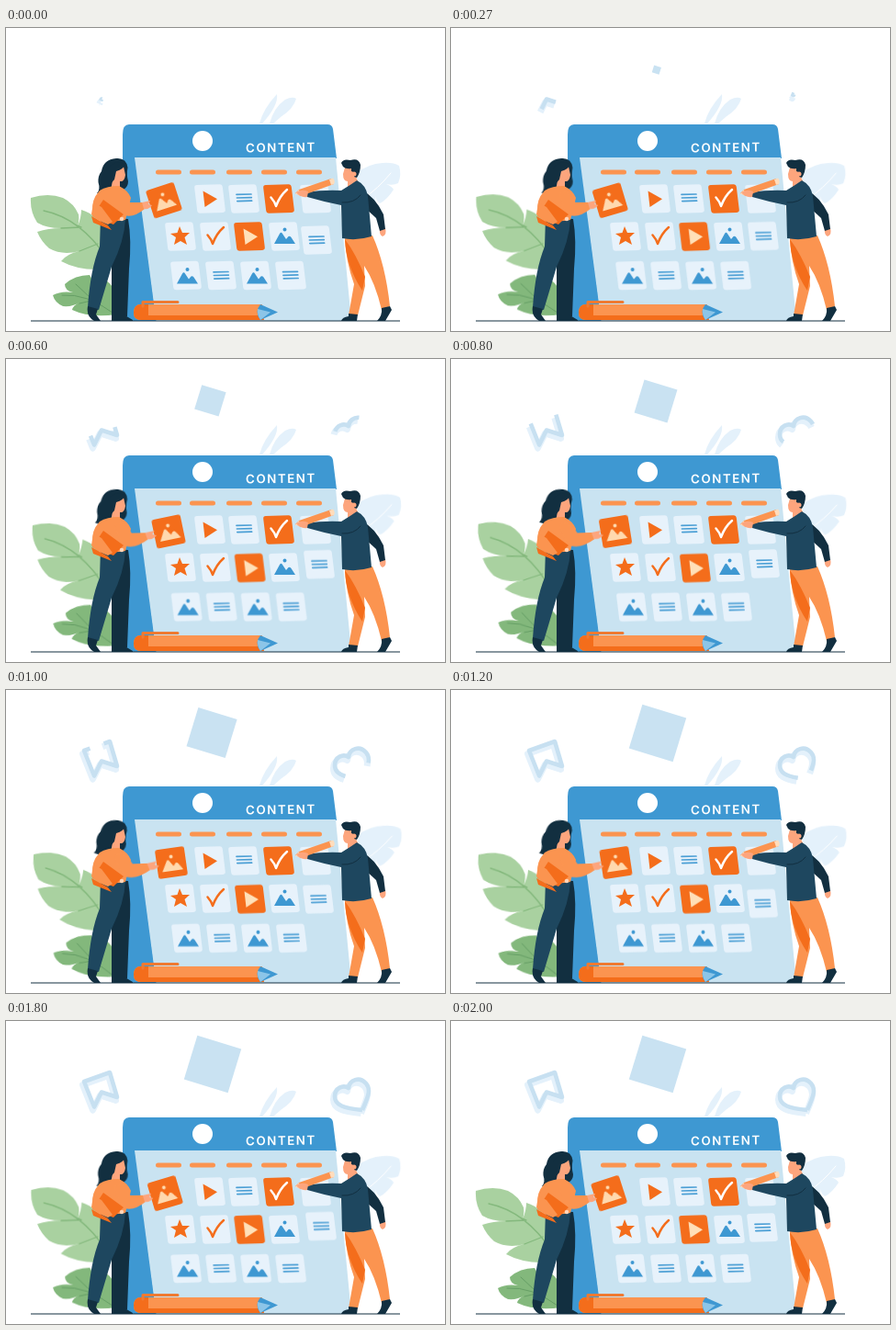
An HTML page for the animation above (2.07 s loop, 478 by 330 pixels).

```html
<!DOCTYPE html>
<html lang="en">
<head>
<meta charset="utf-8">
<title>Content calendar</title>
<style>
html, body { margin: 0; width: 100%; height: 100%; overflow: hidden; background: #fff; }
svg { display: block; width: 100vw; height: 100vh; }

:root {
  --blue: #3e98d2; --panel: #c9e3f1; --pale: #e4f1fb; --tile: #e7f2fb;
  --orange: #f46d1b; --peach: #fb9450; --skin: #fda57d;
  --navy: #1e475f; --ink: #122f40; --leaf: #a9d1a0; --moss: #83b87c;
}
text { font: 600 13.4px Inter, "Open Sans", sans-serif; letter-spacing: 1.5px; fill: #fff; }
.line { fill: none; stroke-linecap: round; stroke-linejoin: round; }

/* sway: out and back once per loop */
.sway { animation: 1.035s cubic-bezier(.37, 0, .63, 1) infinite alternate; }
.held { animation-name: held; }
.arm { animation-name: arm; transform-origin: 120px 192px; }
.hair { animation-name: hair; transform-origin: 122px 146px; }
.leaf { animation-name: leaf; transform-origin: 115px 228px; }
.fern { animation-name: leaf; transform-origin: 118px 298px; }
.far { animation-name: far; transform-origin: 388px 200px; }
.drift { animation-name: drift; }
@keyframes held {
  from { transform: translate(172px, 187.7px) rotate(-18deg); }
  to { transform: translate(180px, 188px) rotate(-8deg); }
}
@keyframes arm { to { transform: rotate(-2deg) scaleX(1.2); } }
@keyframes hair { to { transform: rotate(6deg); } }
@keyframes leaf { to { transform: rotate(4deg); } }
@keyframes far { to { transform: rotate(2deg); } }
@keyframes drift { to { transform: translate(1px, .7px); } }

/* loose note wanders, then snaps back */
.note { animation: note 2.07s ease-in-out infinite; }
@keyframes note {
  0% { transform: translate(338px, 231px); }
  22.7% { transform: translate(341px, 224px); }
  38.6% { transform: translate(341px, 223px); }
  58% { transform: translate(339px, 232.5px); }
  71% { transform: translate(346px, 233px); }
  87% { transform: translate(343px, 223.5px); }
  96.6%, 100% { transform: translate(339px, 225px); }
}

/* outlines grow both ways from the notch at mid-path */
.mark { fill: none; stroke-width: 4.6; stroke: #c7e0f1; stroke-linejoin: round; }
.mark .shade { stroke: var(--pale); stroke-width: 7; transform: translate(-1.5px, 3.5px); }
.ribbon path { animation: ribbon 2.07s linear infinite; }
.heart path { animation: heart 2.07s linear infinite; }
@keyframes ribbon {
  0% { stroke-dasharray: 0 49 2 100; }
  22.7% { stroke-dasharray: 0 35 30 100; }
  38.6% { stroke-dasharray: 0 16 68 100; }
  55%, 100% { stroke-dasharray: 0 0 100 100; }
}
@keyframes heart {
  0%, 11% { stroke-dasharray: 0 50 0 100; }
  22.7% { stroke-dasharray: 0 42 16 100; }
  38.6% { stroke-dasharray: 0 24 52 100; }
  58% { stroke-dasharray: 0 9 82 100; }
  69%, 100% { stroke-dasharray: 0 0 100 100; }
}
.badge { animation: badge 2.07s linear infinite; }
@keyframes badge {
  0%, 7% { transform: translate(225px, 46px) rotate(17deg) scale(0); }
  22.7% { transform: translate(222px, 45px) rotate(17deg) scale(.42); }
  38.6% { transform: translate(223px, 46px) rotate(17deg) scale(.75); }
  57%, 100% { transform: translate(225px, 47px) rotate(17deg) scale(1); }
}
</style>
</head>
<body>
<svg viewBox="0 0 478 330" preserveAspectRatio="none">
  <defs>
    <g id="tile"><rect x="-15.300" y="-15.300" width="30.600" height="30.600" rx="3" transform="matrix(1 -.03 .12 1 0 0)"/></g>
    <path id="rows" class="line" d="M-8-3.600 8-4M-7.600 0 8.300-.4M-7.200 3.600 8.600 3.200" stroke="#4b9fd5" stroke-width="1.700"/>
    <path id="hills" d="M-11 9-5-2Q-3.500-4.500-2-2L2 4 4.500 1Q6 0 7.500 2L12 9ZM-1.500-6.500a2 2 0 1 0 4 0a2 2 0 1 0-4 0"/>
    <path id="play" d="M-7.500-8.500 8 .3-5.500 9Z"/>
    <path id="check" class="line" d="M-8.500-.5Q-4.500 4-3 9Q1-2 9-9" stroke-width="2.500"/>
  </defs>

  <!-- leaves -->
  <g fill="var(--pale)">
    <path d="M276 104Q280 88 295 72Q297 84 279 104ZM287 104Q292 86 304 78Q312 74 316 77Q313 88 299 97L291 104Z"/>
    <g class="sway far">
      <path d="M382 192V158Q394 148 410 147Q421 146 428 150Q431 160 427 169Q421 172 414 170Q421 173 422 176Q415 187 407 191Q403 188 402 183Q403 191 402 194Q392 200 384 199Z"/>
      <path class="line" d="M389 186Q405 175 419 158" stroke="#fff" stroke-width="1"/>
    </g>
  </g>
  <g class="sway leaf">
    <path fill="var(--leaf)" d="M114 262Q82 266 60 254Q66 246 80 243Q61 248 47 240Q38 232 34 222Q46 218 60 218Q44 218 34 212Q26 200 27 185Q46 179 62 185Q74 191 79 203Q80 210 78 216Q82 206 82 198Q99 203 106 219L115 240Z"/>
    <path class="line" d="M41 199Q81 207 111 252M60 218 82 217M80 243 100 235M78 215 82 217" stroke="var(--moss)" stroke-width="1.300"/>
  </g>
  <g class="sway fern">
    <path fill="var(--moss)" d="M120 312Q91 316 72 307Q73 302 80 299Q72 304 62 303Q53 299 51 291Q60 286 73 288Q64 286 64 279Q75 269 91 269Q95 275 94 281Q97 275 97 270Q111 272 119 287Z"/>
    <path class="line" d="M61 291Q88 289 116 310M76 279 92 294M80 300 97 296" stroke="#659e65" stroke-width="1"/>
  </g>

  <!-- calendar -->
  <path fill="var(--blue)" d="M134 105H350Q355 105 356 110L360 142H141L164 319H127V116Q127 105 134 105Z"/>
  <path fill="var(--panel)" d="M140 141H359L376 319H163.500Z"/>
  <circle cx="214" cy="123" r="11" fill="#fff"/>
  <text x="261" y="135" transform="rotate(-.8 299 130)">CONTENT</text>
  <path class="line" d="M165.500 157h23M202.500 157h23M242.500 157h23M280.500 157h23M318.500 157h23" stroke="var(--peach)" stroke-width="5"/>

  <g fill="var(--tile)">
    <use href="#tile" x="222" y="186"/><use href="#tile" x="259" y="186"/><use href="#tile" x="337" y="186"/>
    <use href="#tile" x="190" y="227"/><use href="#tile" x="228" y="227"/><use href="#tile" x="303" y="227"/>
  </g>
  <g fill="var(--orange)"><use href="#tile" x="297" y="186"/><use href="#play" x="222" y="186"/></g>
  <use href="#rows" x="259" y="185"/>
  <use href="#check" x="297" y="185" stroke="#fff"/>
  <use href="#check" x="228" y="226" stroke="var(--orange)"/>
  <path fill="var(--orange)" d="M189 216 192 223 200 223 194.500 228 197 236 190 232 183 236 185 228 179 224 186.500 223Z"/>
  <use href="#hills" x="303" y="226" fill="var(--blue)"/>
  <g class="sway drift">
    <use href="#tile" x="265" y="227" fill="var(--orange)"/>
    <use href="#play" x="266" y="227" fill="#ffe0b8"/>
    <g fill="var(--tile)">
      <use href="#tile" x="196" y="269.500"/><use href="#tile" x="234" y="269.500"/>
      <use href="#tile" x="272" y="269.500"/><use href="#tile" x="310" y="269.500"/>
    </g>
    <g fill="var(--blue)"><use href="#hills" x="197" y="269.500"/><use href="#hills" x="273" y="269.500"/></g>
    <use href="#rows" x="234" y="269.500"/><use href="#rows" x="309.500" y="269.300"/>
  </g>
  <g class="note"><use href="#tile" fill="var(--tile)"/><use href="#rows"/></g>

  <path d="M27 319H429" stroke="var(--ink)"/>

  <!-- large pen -->
  <path fill="var(--peach)" d="M147 301H279V318H147Q139 318 139 310Q139 301 147 301Z"/>
  <path fill="var(--orange)" d="M147 301H155V313H280L281 318H147Q139 318 139 310Q139 301 147 301Z"/>
  <path class="line" d="M149 303V298.500H187" stroke="#ee7a32" stroke-width="3"/>
  <path fill="var(--blue)" d="M277 301 296 309.500 277 318Q270 309 277 301Z"/>
  <path fill="#8cc5e8" d="M274 306 288 309.500 277 318Q273 312 274 306Z"/>

  <!-- man -->
  <g>
    <path fill="var(--peach)" d="M369 229 399 226Q413 257 418 303L409 307Q402 277 390 259L391 281 383 313H373L379 279Q370 254 369 229Z"/>
    <path fill="var(--orange)" d="M369 230Q381 246 391 271L388 286Q370 259 369 230Z"/>
    <path fill="var(--ink)" d="M373 311 383 312 382 319H365Q366 315 373 314ZM409 305 418 303 420 307 413 319H404Q410 313 409 305Z"/>
    <path fill="var(--skin)" d="M407 218 413 218Q415 225 410 227Q406 225 407 218ZM369 152 381 151 381 162 385 171 372 174 372 167Q367 167 367 159Z"/>
    <path fill="var(--ink)" d="M388 177Q402 184 411 203L413 219 407 221 403 207 391 196Z"/>
    <path fill="var(--navy)" d="M365 177Q375 171 382 166Q392 171 394 183L398 227Q382 232 366 229L365 193Q345 189 328 184L326 179Q346 176 365 177Z"/>
    <path class="line" d="M366 190Q379 191 386 182" stroke="var(--ink)" stroke-width="1"/>
    <path fill="var(--ink)" d="M365 147Q367 142 375 144Q384 141 386 149Q386 157 382 163L379 162Q380 157 376 156L376 153Q370 154 367 151Z"/>
    <circle cx="379" cy="159" r="2.500" fill="var(--skin)"/>
    <path fill="var(--peach)" d="M315 180 319 176 354 164 357 170 321 183Z"/>
    <path fill="#ffdcbb" d="M315 180.500 319 176 321 183ZM352 165 356 163.500Q359 167 357 170L354 171Z"/>
    <path fill="var(--skin)" d="M316 179Q322 175 329 178L328 184Q320 185 316 179Z"/>
  </g>

  <!-- woman -->
  <g>
    <path class="sway hair" fill="var(--ink)" d="M120 142Q131 141 132.500 152Q131 160 133 167Q133 173 128 176Q114 184 99 180Q103 176 100.500 168Q100 161 104 156Q106 143 120 142Z"/>
    <path fill="var(--ink)" d="M112 207 133 208Q137 231 134 262L132 314H115L115 260Z"/>
    <path fill="var(--navy)" d="M103 206 130 208Q129 232 115 260L101 307 89 304Q92 262 102 238Z"/>
    <path fill="var(--ink)" d="M89 303 100 306 98 312 103 319H96Q87 314 89 303ZM115 312H128L138 318V319H115Z"/>
    <path fill="var(--skin)" d="M115 154Q122 149 128 151L130 160Q129 168 124 167L124 174 114 177 116 166Z"/>
    <path fill="var(--ink)" d="M111 154Q116 143 130 148Q128 154 120 156L118 165 111 173Z"/>
    <path fill="var(--peach)" d="M102 177Q110 172 123 172Q133 177 136 185L130 209Q115 212 104 208L95 199Q92 188 102 177Z"/>
    <path fill="var(--orange)" d="M106 187 128 203 117 214 94 205Z"/>
    <path fill="var(--peach)" d="M95 190 104 195 116 211 111 214Q97 209 93 203Z"/>
    <path fill="var(--orange)" d="M93 205 111 215 115 220 95 212Z"/>
    <circle cx="126" cy="208" r="2.200" fill="#ffd6bb"/>
  </g>
  <g class="sway held">
    <rect x="-16" y="-16" width="32" height="32" rx="3" fill="var(--orange)"/>
    <use href="#hills" fill="#ffd9ae"/>
  </g>
  <g class="sway arm">
    <path fill="var(--peach)" d="M119 180Q128 176 135 190L149 190 151 197Q139 207 129 204Q121 197 119 180Z"/>
    <path fill="var(--skin)" d="M148 190 157 188 155 192 159 193Q156 198 150 197Z"/>
  </g>

  <!-- floating marks -->
  <g class="mark ribbon">
    <path class="shade" pathLength="100" d="M99 61 113 56 121 83 104 77.500 96 93.500 85 66Z"/>
    <path pathLength="100" d="M99 61 113 56 121 83 104 77.500 96 93.500 85 66Z"/>
  </g>
  <rect class="badge" x="-25" y="-25" width="50" height="50" fill="#c9e2f2"/>
  <g class="mark heart">
    <path class="shade" pathLength="100" d="M388 97C368 95 358 92 358 82C358 73 367 69 373 73C374 64 385 60 392 68C398 75 394 83 388 97Z"/>
    <path pathLength="100" d="M388 97C368 95 358 92 358 82C358 73 367 69 373 73C374 64 385 60 392 68C398 75 394 83 388 97Z"/>
  </g>
</svg>
</body>
</html>
```
